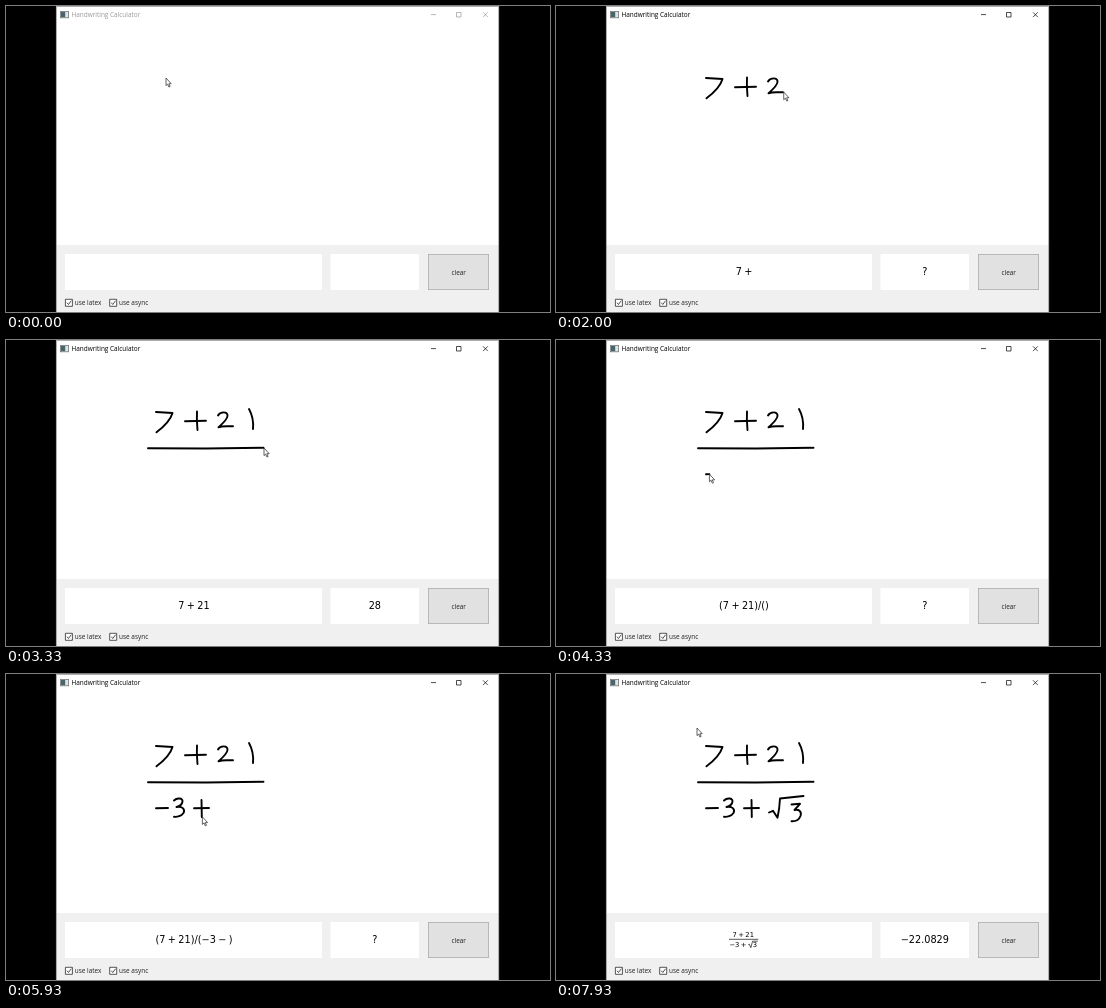
Recreate the animation shown at these times as an HTML page. Size 544 px wide and 306 px high, loop 8000 ms.

```html
<!DOCTYPE html>
<html lang="en">
<head>
<meta charset="utf-8">
<title>Handwriting Calculator</title>
<style>
  html, body { margin: 0; width: 100%; height: 100%; overflow: hidden; background: #000; }
  svg { display: block; width: 100vw; height: 100vh; }
  .ui { font: 6.45px "Open Sans", sans-serif; fill: #222; }
  .math { font: 9.7px "DejaVu Sans", sans-serif; word-spacing: -.07em; text-anchor: middle; fill: #000; }
  .frac text { font-size: 6.75px; }
  .line { fill: none; stroke: #111; stroke-width: .7; }
  #ink path { fill: none; stroke: #000; stroke-width: 1.9; stroke-linecap: round; stroke-linejoin: round; }
  #bar { color: #000; }
  #bar.idle { color: #999; }
  #bar text { fill: currentColor; }
  #bar .line { stroke: currentColor; }
</style>
</head>
<body>
<svg viewBox="0 0 544 306">
  <rect width="544" height="306"/>
  <rect x="50" width="443" height="306" fill="#fff"/>
  <rect x="50" y="239" width="443" height="67" fill="#f0f0f0"/>
  <path d="M50.4 306V.4H492.7V306" fill="none" stroke="#8c8c8c" stroke-width=".8"/>

  <g id="bar" class="ui">
    <rect x="54.4" y="5.4" width="8.2" height="6.4" fill="#dfe5e7" stroke="#777" stroke-width=".8"/>
    <rect x="55" y="6" width="4.2" height="5.2" fill="#47666b"/>
    <text x="65.5" y="11">Handwriting Calculator</text>
    <path class="line" d="M425 8.6h5M450.5 6.5h4.5v4.5h-4.5zM477 6.3l4.8 4.8m0-4.8l-4.8 4.8"/>
  </g>

  <g fill="#fff">
    <rect x="59" y="248" width="257" height="36"/>
    <rect x="324.5" y="248" width="88.5" height="36"/>
  </g>
  <rect x="422.4" y="248.4" width="60.2" height="35.2" fill="#e1e1e1" stroke="#adadad" stroke-width=".8"/>
  <g class="ui">
    <text x="452.7" y="268.6" text-anchor="middle">clear</text>
    <text x="68.8" y="299.2">use latex</text>
    <text x="113" y="299.2">use async</text>
  </g>
  <g class="line">
    <path id="box" d="M59.4 293.3h7v7h-7zM60.9 296.7l1.6 1.8 2.8-3.8" fill="#fff"/>
    <use href="#box" x="44.3"/>
  </g>

  <g class="math">
    <text id="expr" x="188" y="268.8"></text>
    <text id="result" x="368.8" y="268.8"></text>
    <g id="frac1" class="frac">
      <text x="187.5" y="264.6">7 + 21</text>
      <path class="line" d="M176.5 266.3h22"/>
      <text x="187.5" y="272.6">−3</text>
    </g>
    <g id="frac2" class="frac">
      <text x="187.2" y="262.9">7 + 21</text>
      <path class="line" d="M173 265.3h29.2"/>
      <text x="182" y="273.2">−3 +</text>
      <text x="199" y="273.2">3</text>
      <path class="line" d="M192.3 270.6l1-.5 1.5 3.6 1.8-6.5h5.2"/>
    </g>
  </g>

  <g id="ink"></g>
  <path id="cursor" d="M0 0V7.6L1.7 6.1 2.9 9 4.1 8.5 2.9 5.7H5.2Z" fill="#fff" stroke="#222" stroke-width=".7"/>
</svg>
<script>
const LOOP = 8000, STEP = 1000 / 15;
const $ = id => document.getElementById(id);

// Pen strokes: start, end, path
const strokes = [
  [270, 600, 'M150 72L166.5 73Q164 82 150.5 92.3'],
  [900, 1130, 'M179 81.3L200 80.8'],
  [1330, 1500, 'M191 71.5Q190.5 80 191.5 90'],
  [1650, 1980, 'M212 75.5C214 71.5 222 71 221.5 76C221 80 216 84 212.5 87.3C217 85.5 222 86.5 227 86.3'],
  [2270, 2470, 'M243 69Q248 78 247 89'],
  [2730, 3290, 'M142 108.3L200 108.5L257.5 107.8'],
  [4270, 4450, 'M150 134.2L162 134'],
  [4650, 5000, 'M168 126.5C171 123.5 177 124 176.5 127.5C176 131 173 132.5 170.5 133C176 132 179.5 135 177.5 139C175.5 142 171 143.3 168 142.8'],
  [5330, 5530, 'M188 134.3L203 134'],
  [5730, 5900, 'M195.5 126L195.8 143'],
  [6200, 6650, 'M213 138.5L217 136.8L221.5 143.8Q223.5 135 224 124.5L247.5 122'],
  [7000, 7350, 'M235.5 130.5L244 129.8L238.5 136C243 135 246 137.5 244.5 142C243 146 239 147.5 235.5 147.3']
].map(([from, to, d]) => {
  const el = document.createElementNS('http://www.w3.org/2000/svg', 'path');
  el.setAttribute('d', d);
  $('ink').append(el);
  return { from, to, el, len: el.getTotalLength() };
});

// Recognised expression and value; an id in the third place shows a fraction
const states = [
  [0, '', ''],
  [730, '7', '7'],
  [1330, '7 −', '?'],
  [1730, '7 +', '?'],
  [2260, '7 + 2', '9'],
  [2730, '7 + 21', '28'],
  [3600, '(7 + 21)/()', '?'],
  [4660, '(7 + 21)/(−)', '?'],
  [5190, '', '−9.33333', 'frac1'],
  [5800, '(7 + 21)/(−3 − )', '?'],
  [6130, '(7 + 21)/(−3 + )', '?'],
  [7660, '', '−22.0829', 'frac2']
];

const clamp = x => Math.max(0, Math.min(1, x));
const ease = x => x * x * (3 - 2 * x);

// Cursor stops: resting points plus both ends of each stroke
const stops = [
  [0, 160, 72], [60, 160, 72], [66, 150, 72],
  [780, 180, 81], [2010, 228, 86], [3330, 258, 108], [3550, 258, 110],
  [4130, 150, 134], [5190, 189, 134], [6670, 248, 122],
  [7870, 143, 56], [7930, 141, 54], [LOOP, 141, 54]
];
for (const s of strokes) {
  const a = s.el.getPointAtLength(0), b = s.el.getPointAtLength(s.len);
  stops.push([s.from, a.x, a.y], [s.to, b.x, b.y]);
}
stops.sort((a, b) => a[0] - b[0]);

function cursorAt(t) {
  const s = strokes.find(s => t >= s.from && t <= s.to);
  if (s) {
    const p = s.el.getPointAtLength(s.len * ease((t - s.from) / (s.to - s.from)));
    return [p.x, p.y];
  }
  const i = Math.max(1, stops.findIndex(p => p[0] > t));
  const [t0, x0, y0] = stops[i - 1], [t1, x1, y1] = stops[i];
  const k = ease(clamp((t - t0) / (t1 - t0)));
  return [x0 + (x1 - x0) * k, y0 + (y1 - y0) * k];
}

function draw(t) {
  for (const s of strokes) {
    const k = ease(clamp((t - s.from) / (s.to - s.from)));
    s.el.style.visibility = k > 0 ? 'visible' : 'hidden';
    s.el.style.strokeDasharray = k < 1 ? `${s.len * k} ${s.len + 9}` : 'none';
  }
  const [, expr, result, frac] = states.filter(s => s[0] <= t).pop();
  $('expr').textContent = expr;
  $('result').textContent = result;
  for (const id of ['frac1', 'frac2']) $(id).style.display = id === frac ? '' : 'none';
  $('bar').classList.toggle('idle', t < 260);
  $('cursor').setAttribute('transform', `translate(${cursorAt(t)})`);
}

const start = performance.now();
function tick() {
  const t = (performance.now() - start) % LOOP;
  draw(Math.floor((t + 4) / STEP) * STEP % LOOP);
  requestAnimationFrame(tick);
}
tick();
</script>
</body>
</html>
```
